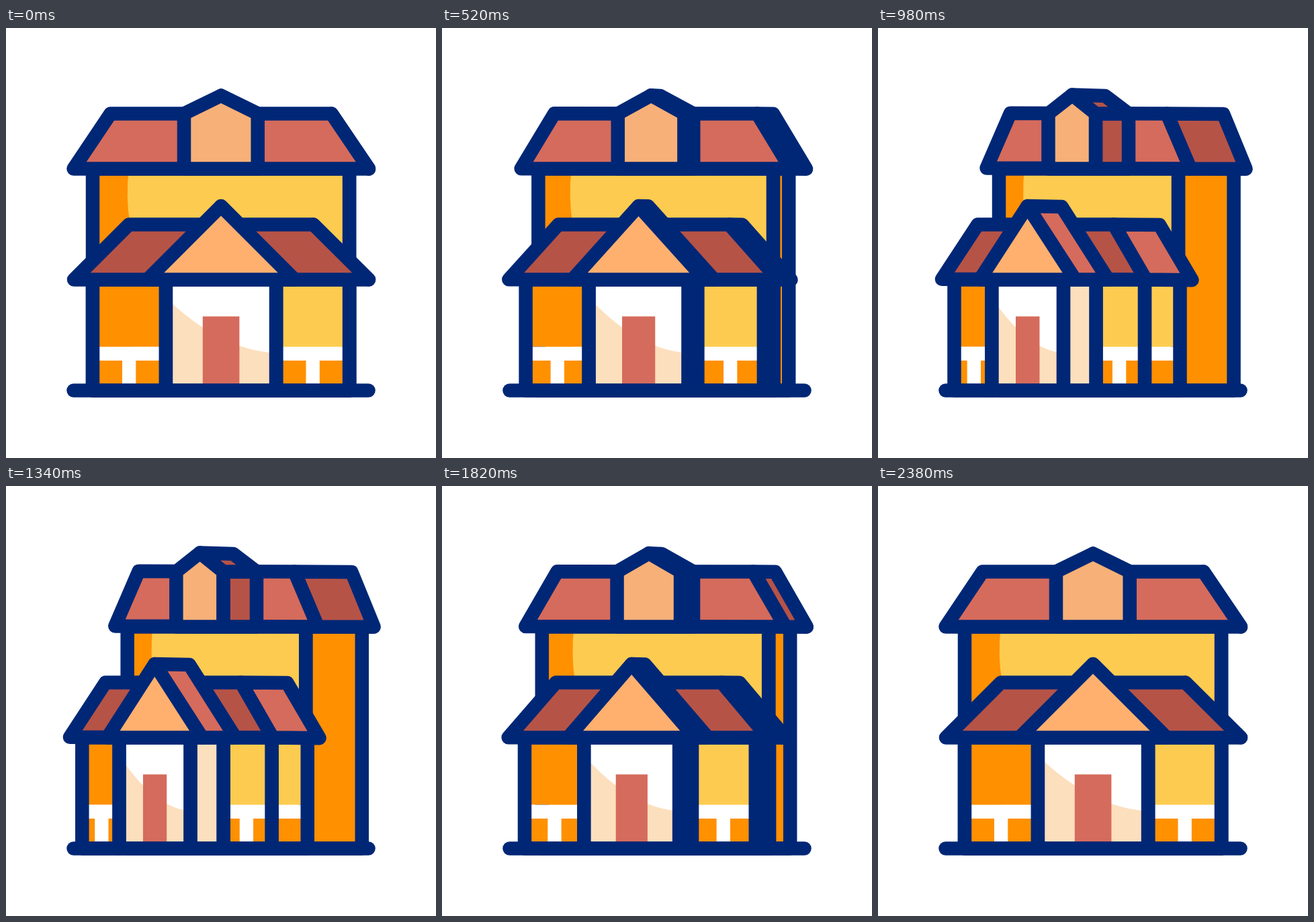
Recreate the animation shown at these times as an HTML page with a canvas. Size 640 by 640 pixels, loop 2.4 s.

```html
<!DOCTYPE html>
<html lang="en">
<head>
<meta charset="utf-8">
<title>Turning house</title>
<style>
  html, body { margin: 0; height: 100%; overflow: hidden; background: #fff; }
  canvas { display: block; width: 640px; height: 640px; }
</style>
</head>
<body>
<canvas id="stage" width="640" height="640"></canvas>
<script>
const ctx = document.getElementById('stage').getContext('2d');
const NAVY = '#002776', RED = '#d56b5c', DARK = '#b55347', YELLOW = '#fdcb50',
      ORANGE = '#ff9000', PEACH = '#f7b077', GABLE = '#ffb06f', CREAM = '#fcdfbd', WHITE = '#fff';
const LOOP = 2400, HALF = 1190, GROUND = 539.5, EAVE = 374.5;

// Symmetric cubic bezier (.77, 0, .23, 1)
function ease(u) {
  let lo = 0, hi = 1;
  for (let i = 0; i < 30; i++) {
    const t = (lo + hi) / 2, r = 1 - t;
    if (3 * r * r * t * 0.77 + 3 * r * t * t * 0.23 + t * t * t < u) lo = t; else hi = t;
  }
  return lo * lo * (3 - 2 * lo);
}

let turn = 0;
const mix = (front, turned) => front + (turned - front) * turn;

function outline() {
  ctx.strokeStyle = NAVY;
  ctx.stroke();
}

function poly(fill, ...points) {
  ctx.beginPath();
  points.forEach(([x, y]) => ctx.lineTo(x, y));
  ctx.closePath();
  ctx.fillStyle = fill;
  ctx.fill();
  outline();
}

function rect(fill, x1, y1, x2, y2) {
  ctx.fillStyle = fill;
  ctx.fillRect(x1, y1, x2 - x1, y2 - y1);
}

function frame(x1, y1, x2, y2) {
  ctx.beginPath();
  ctx.rect(x1, y1, x2 - x1, y2 - y1);
  outline();
}

function terrace(x1, x2, wall, post) {
  rect(wall, x1, EAVE, x2, 474.5);
  rect(WHITE, x1, 474.5, x2, 495);
  rect(ORANGE, x1, 495, x2, GROUND);
  if (post) rect(WHITE, post, 495, post + 20.3, GROUND);
  frame(x1, EAVE, x2, GROUND);
}

function upperFloor() {
  const left = mix(129, 180), corner = mix(511, 447), right = mix(511, 529.5), top = 209.5;
  const shade = f => left + (corner - left) * f;

  rect(ORANGE, corner, top, right, GROUND);
  frame(corner, top, right, GROUND);
  rect(YELLOW, left, top, corner, GROUND);
  ctx.beginPath();
  ctx.moveTo(left, top);
  ctx.lineTo(shade(0.141), top);
  ctx.quadraticCurveTo(shade(0.128), 252, shade(0.145), 290);
  ctx.lineTo(shade(0.145), GROUND);
  ctx.lineTo(left, GROUND);
  ctx.fillStyle = ORANGE;
  ctx.fill();
  frame(left, top, corner, GROUND);

  const ridge = [mix(484.5, 430), 127.5], eave = [mix(540, 465), 209.5];
  poly(DARK, ridge, [mix(484.5, 514), mix(127.5, 128)], [mix(540, 547.5), 209.7], eave);
  poly(RED, [mix(155.5, 197), mix(127.5, 126.7)], ridge, eave, [mix(100.5, 161.5), mix(209.5, 208.5)]);
}

function dormer() {
  const left = mix(265, 253.5), corner = mix(374.7, 324), back = mix(374.7, 373);
  const peak = [mix(320, 289), mix(100.6, 99.6)];
  const eave = 127.5, base = 209.5;
  poly(DARK, [corner, eave], [back, eave], [back, base], [corner, base]);
  poly(DARK, peak, [mix(320, 338), 101], [back, eave], [corner, eave]);
  poly(PEACH, peak, [corner, eave], [corner, base], [left, base], [left, eave]);
}

function porch() {
  const corner = mix(511, 397);
  terrace(corner, mix(511, 449.5), YELLOW);
  terrace(mix(402, 324.5), corner, YELLOW, mix(446.5, 349));
  terrace(mix(129, 113.5), mix(238, 169.5), ORANGE, mix(173, 132.7));

  const ridge = [mix(457.5, 351), 292.5], eave = [mix(540, 398.6), EAVE];
  poly(RED, ridge, [mix(457.5, 419), mix(292.5, 293)], [mix(540, 467.5), mix(EAVE, 375.2)], eave);
  poly(DARK, [mix(183, 148.5), 292.5], ridge, eave, [mix(101, 95), mix(EAVE, 373.8)]);
}

function entrance() {
  const left = mix(238, 169.5), right = mix(402, 276), back = mix(402, 324.5);
  const across = f => left + (right - left) * f;

  rect(CREAM, right, EAVE, back, GROUND);
  frame(right, EAVE, back, GROUND);
  rect(WHITE, left, EAVE, right, GROUND);
  ctx.beginPath();
  ctx.moveTo(left, 401.5);
  ctx.quadraticCurveTo(across(0.5), 480.2, right, 483.6);
  ctx.lineTo(right, GROUND);
  ctx.lineTo(left, GROUND);
  ctx.fillStyle = CREAM;
  ctx.fill();
  rect(RED, across(0.334), 429.3, across(0.667), GROUND);
  frame(left, EAVE, right, GROUND);

  const peak = [mix(320, 222.5), 265], eave = [mix(429.5, 293.5), EAVE];
  poly(RED, peak, [mix(320, 273.5), mix(265, 266)], [mix(429.5, 342.6), EAVE], eave);
  poly(GABLE, peak, eave, [mix(210.5, 151.5), EAVE]);
}

function draw(now) {
  const t = now % LOOP;
  turn = ease(Math.max(0, 1 - Math.abs(t - HALF) / HALF)) / 0.977;
  rect(WHITE, 0, 0, 640, 640);
  ctx.lineWidth = 20.5;
  ctx.lineJoin = ctx.lineCap = 'round';
  upperFloor();
  dormer();
  porch();
  entrance();
  ctx.beginPath();
  ctx.moveTo(100.5, GROUND);
  ctx.lineTo(539.5, GROUND);
  outline();
}

let start;
function tick(now) {
  start ??= now;
  draw(now - start);
  requestAnimationFrame(tick);
}
draw(0);
requestAnimationFrame(tick);
</script>
</body>
</html>
```
